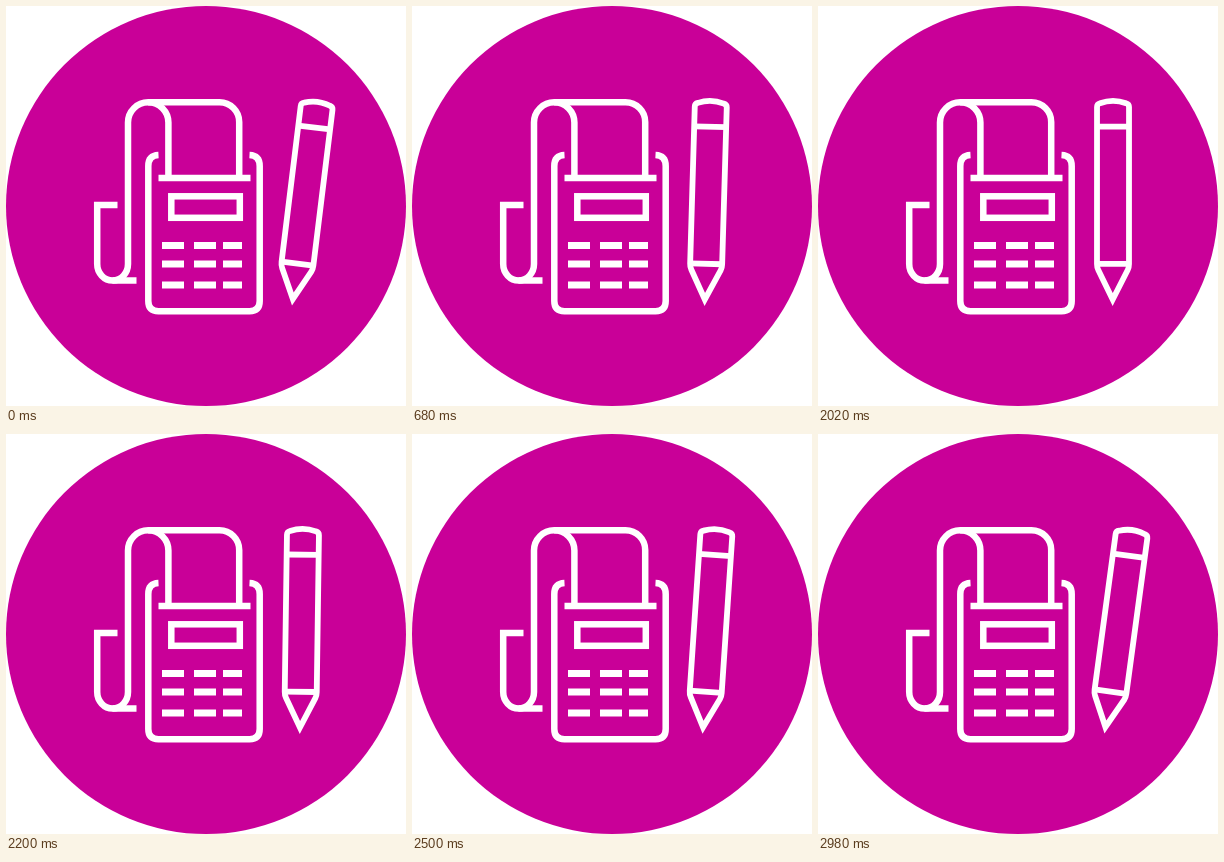
Animation, 400 px wide and 400 px high, one loop 3000 ms. Source, as an HTML page:

```html
<!DOCTYPE html>
<html lang="en">
<head>
<meta charset="utf-8">
<title>Card terminal and pencil</title>
<style>
  html, body { margin: 0; width: 100%; height: 100%; overflow: hidden; background: #fff; }
  svg { display: block; width: 100vw; height: 100vh; }
  .line { fill: none; stroke: #fff; stroke-width: 6.5; }
</style>
</head>
<body>
<svg viewBox="0 0 400 400">
  <circle cx="200" cy="200" r="200" fill="#c90098"/>

  <g class="line">
    <!-- paper roll -->
    <path d="M111.5 199H91.2V258A15.4 16.5 0 0 0 122 258V116.5A20.2 20.2 0 0 1 162.4 116.5V172"/>
    <path d="M142 96.3H213.5A19.7 19.7 0 0 1 233.2 116V172"/>
    <path d="M106.5 274.5H130.5"/>
    <!-- terminal -->
    <path d="M152.5 149Q142.3 149.500 142.3 160V295Q142.3 305.200 152.5 305.200H243.5Q253.7 305.200 253.7 295V160Q253.7 149.500 243.5 149"/>
    <path d="M152.500 172H244.500"/>
    <rect x="165.300" y="190.300" width="68.500" height="21.500"/>
    <path id="keys" stroke-width="7"/>
  </g>

  <g id="pencil" class="line" style="stroke-width:5.800" stroke-linejoin="miter">
    <path d="M279 101Q279 98 282 97.200Q295 92.400 308 97.200Q311 98 311 101V258Q311 261.500 309.700 264L294.700 293.500L280.300 264Q279 261.500 279 258Z"/>
    <path d="M279 120.700H311M279 257.800H311"/>
  </g>
</svg>
<script>
  const LOOP = 3000;
  const pencil = document.getElementById('pencil');

  const cols = [[156, 22], [188, 22], [217, 19]];
  const rows = [239.5, 258, 279];
  document.getElementById('keys').setAttribute('d',
    rows.map(y => cols.map(([x, w]) => `M${x} ${y}h${w}`).join('')).join(''));

  const ease = p => p * p * (3 - 2 * p);

  // Straightens up, rests, then leans out again around a lower pivot.
  function pose(t) {
    if (t < 1000) return [7 * (1 - ease(t / 1000)), 229];
    if (t < 2000) return [0, 229];
    return [7.7 * ease((t - 2000) / 1000), 239];
  }

  function draw(t) {
    const [angle, pivotY] = pose(t);
    pencil.setAttribute('transform', `rotate(${angle} 295 ${pivotY})`);
  }

  const start = performance.now();
  function tick() {
    draw((performance.now() - start) % LOOP);
    requestAnimationFrame(tick);
  }
  tick();
</script>
</body>
</html>
```
